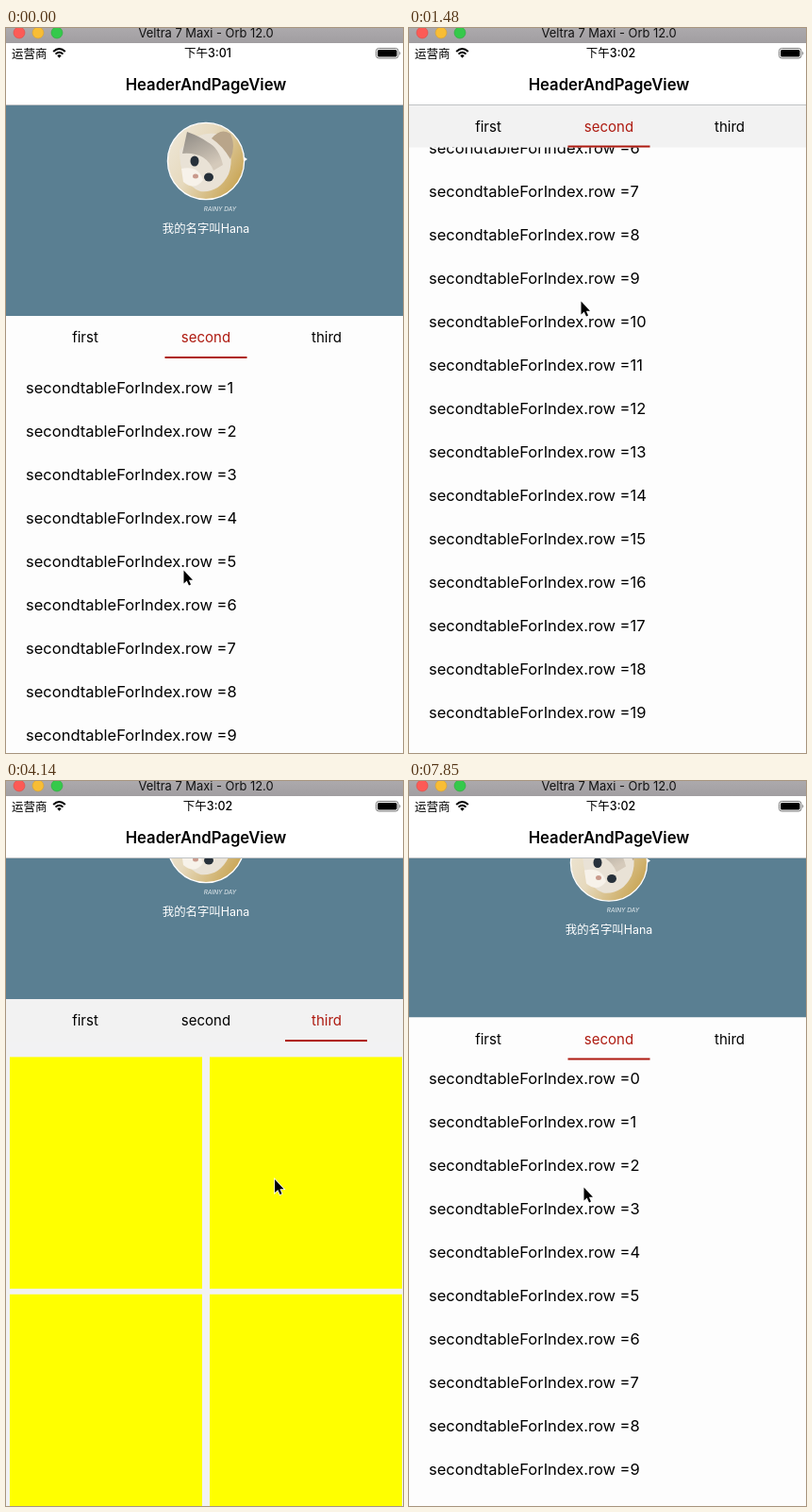
An HTML page for the animation above (8 s loop, 421 px wide and 768 px high).

```html
<!DOCTYPE html>
<html lang="zh">
<head>
<meta charset="utf-8">
<title>HeaderAndPageView</title>
<style>
  html, body { margin: 0; width: 100%; height: 100%; overflow: hidden; background: #fdfdfd; }
  svg { display: block; width: 421px; height: 768px; }
  text { font-family: Inter, "Noto Sans CJK SC", "Noto Sans CJK", sans-serif; }
  .mid { text-anchor: middle; }
  .row { font-size: 16.5px; }
  .tab { font-size: 15px; }
</style>
</head>
<body>
<svg viewBox="0 0 421 768">
  <defs>
    <linearGradient id="fur" x1="0" y1="0" x2="1" y2=".6">
      <stop offset="0" stop-color="#efe9dc"/>
      <stop offset=".5" stop-color="#e6d9bd"/>
      <stop offset="1" stop-color="#cba95c"/>
    </linearGradient>
    <linearGradient id="brow" x1="0" y1="0" x2=".5" y2="1">
      <stop offset="0" stop-color="#8d8983"/>
      <stop offset="1" stop-color="#d5cabb"/>
    </linearGradient>
    <linearGradient id="strip" x1="0" y1="0" x2="0" y2="1">
      <stop offset="0" stop-color="#aca9ac"/>
      <stop offset="1" stop-color="#a19ea1"/>
    </linearGradient>
    <clipPath id="round"><circle r="40.5"/></clipPath>
  </defs>

  <rect id="page" width="421" height="768"/>
  <g id="list"></g>
  <g id="grid" fill="#ff0"></g>

  <rect id="head" y="81.500" width="421" fill="#5a7f92"/>
  <g id="profile">
    <g transform="translate(212 -164)">
      <g clip-path="url(#round)">
        <circle r="41" fill="url(#fur)"/>
        <path d="M-28-12Q-8-34 16-28Q32-8 24 14Q14 34-6 32Q-28 24-28-12Z" fill="#e9e2d6"/>
        <path d="M-25-8L-20-31Q-6-26 2-20Q14-14 18 4L8 10Q0-10-25-8Z" fill="url(#brow)"/>
        <path d="M6-24Q16-36 26-29Q32-16 26-2Q18-16 6-24Z" fill="#b9a58a"/>
        <path d="M-26 8Q-8 4-3 20Q-12 32-24 22Z" fill="#f7f2ea"/>
        <ellipse cx="-11" cy="16" rx="3" ry="2.500" fill="#c99a8c"/>
        <g fill="#26303a">
          <ellipse cx="-12" cy="0" rx="4.500" ry="5.500"/>
          <ellipse cx="3" cy="17" rx="5" ry="4.500"/>
        </g>
      </g>
      <circle r="40.6" fill="none" stroke="#fff" stroke-width="1.3"/>
      <path d="M41-4L44-2L41 0Z" fill="#fff"/>
    </g>
    <text class="mid" x="227" y="-111.500" font-size="6.500" font-style="italic" fill="#e8eef1">RAINY DAY</text>
    <text class="mid" x="212" y="-88.500" font-size="12.400" fill="#fff">我的名字叫Hana</text>
  </g>

  <g id="bar">
    <rect id="barBg" width="421" height="45"/>
    <text class="tab mid" x="84" y="28">first</text>
    <text class="tab mid" x="212" y="28">second</text>
    <text class="tab mid" x="340" y="28">third</text>
    <rect id="line" y="43" width="87" height="2" fill="#ae1a10"/>
  </g>

  <rect y="16" width="421" height="65" fill="#fff"/>
  <rect y="81" width="421" height="1" fill="#bfc2c4"/>
  <text class="mid" x="212" y="65.500" font-size="16.700" font-weight="600">HeaderAndPageView</text>
  <text x="6" y="31.500" font-size="12.500">运营商</text>
  <g fill="none" stroke="#000" stroke-width="2">
    <path d="M50.200 25Q56.500 19 62.800 25"/>
    <path d="M52.500 27.600Q56.500 23.800 60.500 27.600"/>
  </g>
  <path d="M54.300 29.300Q56.500 27.400 58.700 29.300L56.500 31.800Z"/>
  <text id="clock" class="mid" x="214" y="31.300" font-size="12.500" font-weight="500"></text>
  <rect x="392.500" y="21.500" width="23.500" height="10.500" rx="2.800" fill="none" stroke="#777"/>
  <rect x="394" y="23" width="20.500" height="7.500" rx="1.600"/>
  <path d="M417.300 24.800Q419.400 26.800 417.300 28.800Z" fill="#777"/>

  <rect width="421" height="16" fill="url(#strip)"/>
  <circle cx="14" cy="5" r="6" fill="#fc5b56" stroke="#dd4a45" stroke-width=".6"/>
  <circle cx="34" cy="5" r="6" fill="#f8bd35" stroke="#d79f2c" stroke-width=".6"/>
  <circle cx="54" cy="5" r="6" fill="#35c94b" stroke="#2aa93b" stroke-width=".6"/>
  <text class="mid" x="212" y="9.600" font-size="12.900" fill="#111">Veltra 7 Maxi - Orb 12.0</text>

  <g id="cursor">
    <path d="M.5 .5V14.500L3.700 11.500L6 16.500L8 15.600L5.900 10.700H10Z"
          stroke="#fff" stroke-width="1.600" paint-order="stroke"/>
  </g>
</svg>

<script>
const LOOP = 8000, TICKS = 54, LEAD = 13;
const TOP = 81.5, FULL = 305, BAR = 45, ROW = 46, CELL = 251.4;
const NS = 'http://www.w3.org/2000/svg';
const $ = id => document.getElementById(id);
const tabs = document.querySelectorAll('.tab');

const part = (k, a, b) => Math.min(1, Math.max(0, (k - a) / (b - a)));
const smooth = (k, a, b) => { const p = part(k, a, b); return p * p * (3 - 2 * p); };
const slow = (k, a, b, power) => 1 - (1 - part(k, a, b)) ** power;

// Pointer moves: start tick, end tick, x, y.
const HOME = [188, 574];
const moves = [
  [0, 4, 170, 410], [4, 10, 182, 289], [10, 13, 361, 145], [14, 20, 333, 112],
  [23, 29.5, 277, 470], [33, 39, 213, 307], [45, 53, 185, 430]
];

function pointer(k) {
  let [x, y] = HOME;
  for (const [a, b, toX, toY] of moves) {
    const p = smooth(k, a, b);
    x += (toX - x) * p;
    y += (toY - y) * p;
  }
  return [x, y];
}

function add(parent, tag, attrs, label = '') {
  const el = document.createElementNS(NS, tag);
  for (const key in attrs) el.setAttribute(key, attrs[key]);
  el.textContent = label;
  parent.appendChild(el);
}

const move = (id, x, y) => $(id).setAttribute('transform', `translate(${x} ${y})`);
const show = (id, on) => $(id).setAttribute('display', on ? 'inline' : 'none');

for (let i = 0; i < 20; i++)
  add($('list'), 'text', { class: 'row', x: 21, y: i * ROW + 6 }, 'secondtableForIndex.row =' + i);
for (let i = 0; i < 5; i++)
  add($('grid'), 'rect', { x: 4 + i % 2 * 212, y: (i >> 1) * CELL, width: 204, height: CELL - 6 });

function draw(t) {
  const k = Math.floor((t + LEAD) * TICKS / LOOP) % TICKS;
  const third = k >= 21 && k < 42;

  // An upward drag lifts header and list together; the list then bounces back.
  const drag = 261 * slow(k, 0, 10, 1.77);
  const nudge = part(k, 51, 53);
  const y = Math.max(TOP, FULL - drag) + 195 * slow(k, 25, 30, 1.59) - 26 * nudge;
  const scroll = k < 42 ? 38 + drag - 20 * smooth(k, 10, 13) : 4 * nudge;
  const pull = Math.max(0, 7 - 2 * Math.abs(k - 28));
  const sel = 1 + smooth(k, 20.3, 22.4) - smooth(k, 41.3, 43.4);

  $('page').setAttribute('fill', third ? '#f2f2f3' : '#fdfdfd');
  show('list', !third);
  show('grid', third);
  move('list', 0, y + BAR + ROW / 2 - scroll);
  move('grid', 0, y + BAR + 9.3 + pull);

  $('head').setAttribute('height', y - TOP);
  move('profile', 0, y);
  move('bar', 0, y);
  $('barBg').setAttribute('fill', k >= 2 && k < 42 ? '#f2f2f2' : '#fdfdfd');
  $('line').setAttribute('x', 168.5 + (sel - 1) * 127.5);
  tabs.forEach((tab, i) => {
    const w = Math.max(0, 1 - Math.abs(i - sel));
    tab.setAttribute('fill', `rgb(${174 * w},${26 * w},${16 * w})`);
  });

  $('clock').textContent = '下午3:0' + (k < 2 ? 1 : 2);
  move('cursor', ...pointer(k));
}

const start = performance.now();
function loop() {
  draw((performance.now() - start) % LOOP);
  requestAnimationFrame(loop);
}
loop();
</script>
</body>
</html>
```
